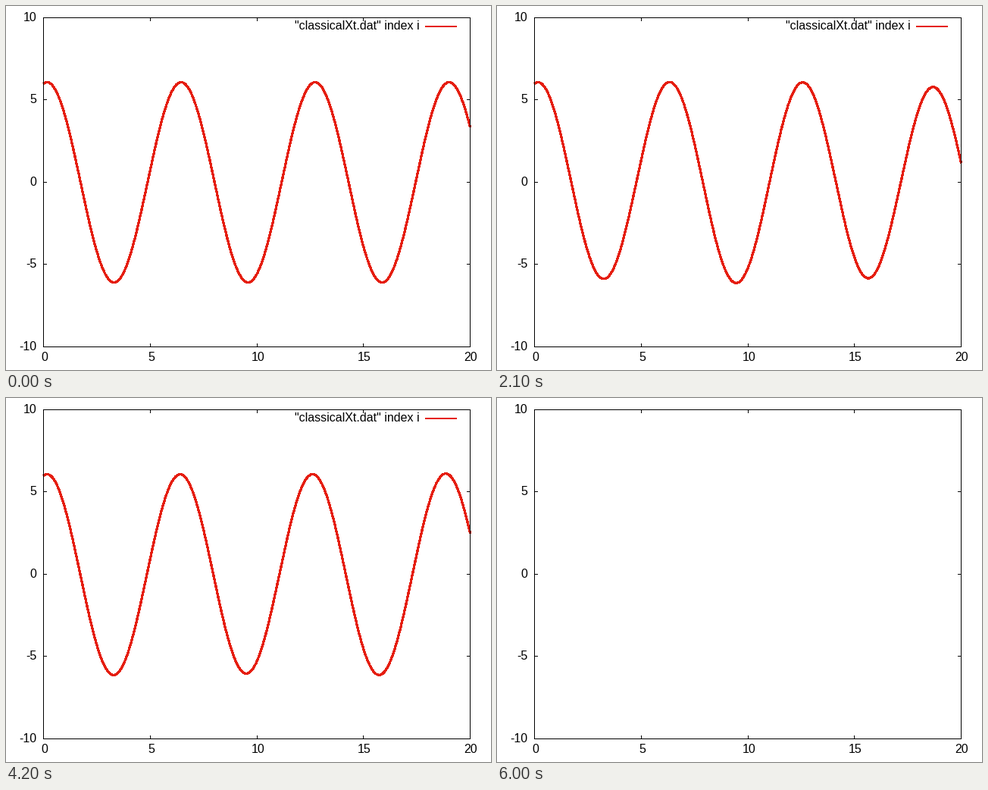
Write a matplotlib script that moves like this. It is 640x480 px and loops after 6.3 s.

```python
import numpy as np
import matplotlib.pyplot as plt
from matplotlib.animation import FuncAnimation

W, H, DPI = 640, 480, 100
PX = 72 / DPI                       # one pixel in points
LEFT, RIGHT, TOP, BOTTOM = 49.5, 612.5, 15.5, 449.5
RED = "#e51e10"
FRAMES, STEP_MS = 21, 300
T_MAX = 20

LEVEL = 6.12                        # undisturbed height of a swing
BEAT = 16.5                         # time between two dips in the amplitude
START = (0.165, 37 ** 0.5)          # first crest, shared by all curves
UNSTABLE = 18                       # from this index on the swing breaks up
MIRROR = 16.8                       # the broken motion runs back from here

# Crests and troughs of the broken motion up to the mirror time.
BROKEN = [START, (3.24, -5.9), (6.17, 5.13), (8.58, -3.18), (9.99, 1.4),
          (11.4, -2.93), (12.72, 1.25), (13.98, -1.87), (15.09, 1.71),
          (16.29, -0.65), (MIRROR, 0.62)]

plt.rcParams["font.family"] = "Liberation Sans"


def swing_turns(i):
    """Turning points of a swing whose amplitude dips once per beat."""
    depth = 1.5 * np.exp(-0.2 * i)
    center = 2.6 + 4.2 * i ** 0.65
    turns, sign = [START], 1
    while turns[-1][0] < T_MAX:
        t, x = turns[-1]
        sign = -sign
        dip = np.cos(np.pi * (t + 3.1 - center) / BEAT) ** 4
        height = LEVEL - depth * dip
        # a lower swing is also a quicker one
        gap = 3.125 - 0.29 * (LEVEL - (abs(x) + height) / 2)
        turns.append((t + gap, sign * height))
    return turns


def broken_turns(i):
    """Irregular turning points, then the same ones in reverse."""
    back = [(MIRROR + 1.05 * (MIRROR - t), x) for t, x in BROKEN[-2:2:-1]]
    rate = 1 - 0.015 * (i - UNSTABLE)
    return [START] + [(t * rate, x) for t, x in BROKEN[1:] + back]


def through(turns, t):
    """Half a cosine between each pair of turning points."""
    tt, xx = np.array(turns).T
    k = np.clip(np.searchsorted(tt, t, side="right") - 1, 0, len(tt) - 2)
    u = (t - tt[k]) / (tt[k + 1] - tt[k])
    return xx[k] + (xx[k + 1] - xx[k]) * (1 - np.cos(np.pi * u)) / 2


def position(i, t):
    if i == 0:
        return 6 * np.cos(t) + np.sin(t)
    turns = swing_turns(i) if i < UNSTABLE else broken_turns(i)
    return through(turns, t)


def to_x(t):
    return LEFT + t * (RIGHT - LEFT) / T_MAX


def to_y(x):
    return (TOP + BOTTOM) / 2 - x * (BOTTOM - TOP) / 20


fig = plt.figure(figsize=(W / DPI, H / DPI), dpi=DPI, facecolor="white")
ax = fig.add_axes([0, 0, 1, 1])
ax.set_xlim(0, W)
ax.set_ylim(H, 0)
ax.axis("off")


def rule(xs, ys):
    ax.plot(xs, ys, color="black", lw=PX, snap=False, zorder=3,
            solid_capstyle="projecting", solid_joinstyle="miter")


def label(x, y, s, ha):
    return ax.text(x, y, s, ha=ha, va="baseline", fontsize=16 * PX,
                   color="black")


rule([LEFT, RIGHT, RIGHT, LEFT, LEFT], [TOP, TOP, BOTTOM, BOTTOM, TOP])
for v in range(0, T_MAX + 1, 5):
    x = np.floor(to_x(v)) + 0.5
    rule([x, x], [TOP, TOP + 4])
    rule([x, x], [BOTTOM, BOTTOM - 4])
    label(x + 1, 468, str(v), "center")
for v in range(-10, 11, 5):
    y = np.ceil(to_y(v)) - 0.5
    rule([LEFT, LEFT + 4], [y, y])
    rule([RIGHT, RIGHT - 4], [y, y])
    label(40.5, y + 4.5, str(v), "right")

key_text = label(546, 31, '"classicalXt.dat" index i', "right")
key_line, = ax.plot([553, 595], [27, 27], color=RED, lw=2 * PX, snap=False,
                    solid_capstyle="butt")
curve, = ax.plot([], [], color=RED, lw=2.2 * PX, antialiased=False,
                 snap=False, solid_capstyle="butt", solid_joinstyle="round")
times = np.linspace(0, T_MAX, 601)


def update(i):
    shown = i < FRAMES - 1
    for part in (key_text, key_line, curve):
        part.set_visible(shown)
    if shown:
        curve.set_data(to_x(times), to_y(position(i, times)))
    return key_text, key_line, curve


anim = FuncAnimation(fig, update, frames=FRAMES, interval=STEP_MS,
                     repeat=True, repeat_delay=0, blit=False)
plt.show()
```
